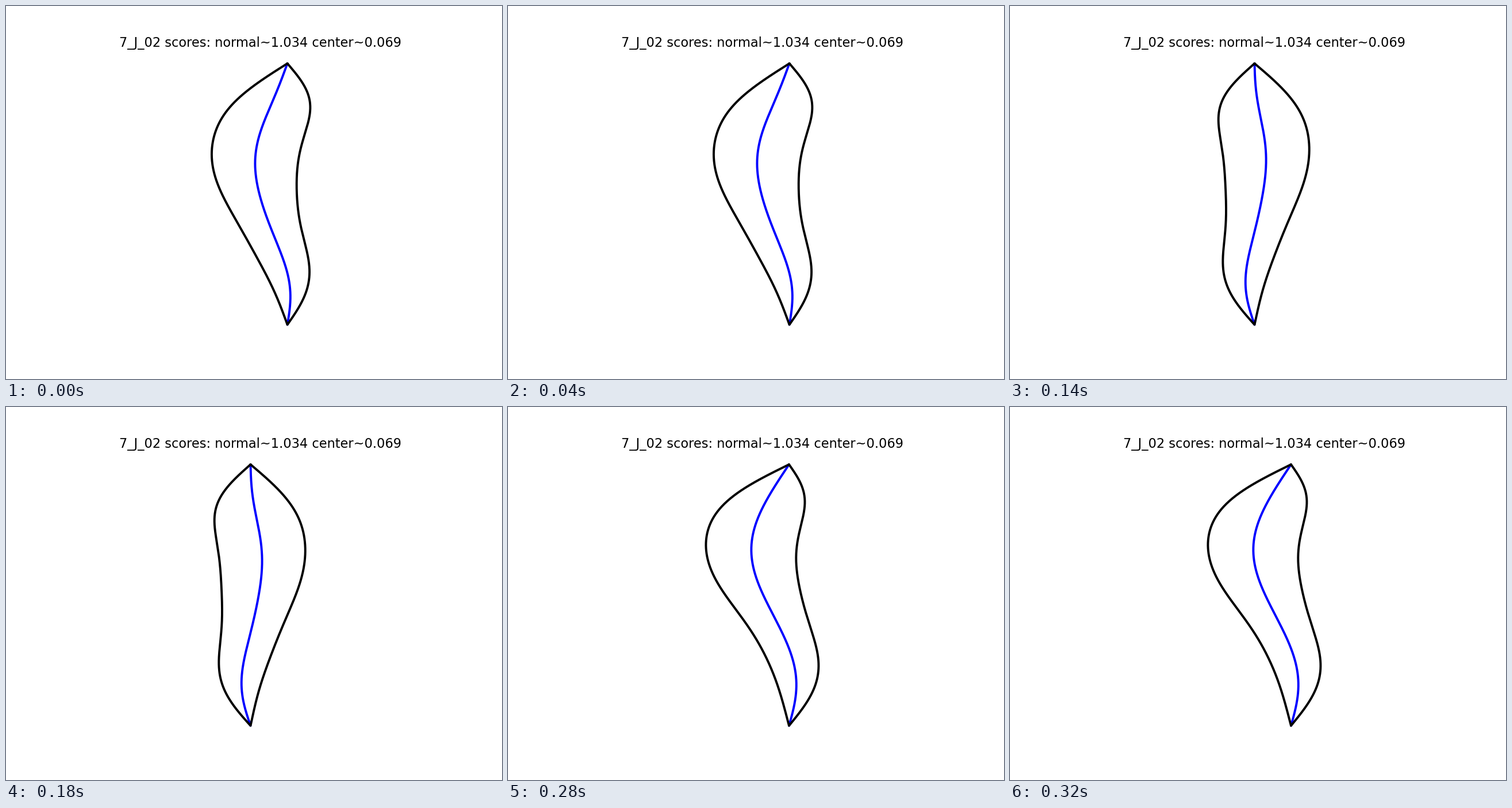
A matplotlib script for the animation above (350 ms loop, 863x649 px).

```python
import numpy as np
import matplotlib.pyplot as plt
from matplotlib.animation import FuncAnimation

W, H, DPI = 863, 649, 64
PT = 72 / DPI  # points per pixel
FRAMES = 5
TOP, BOTTOM = 100, 554.5

# Each swing is a mean followed by cosine and sine parts of its harmonics in time.
TIP = [462.3, 30.2, -16.8, -2.9, 1.7]
# The midline bends as a sum of standing sine waves between the two tips.
BENDS = [
    [-20.3, -31.7, 3.1, 9.1, 1.9],
    [-8.8, -10.1, 23.1],
    [-0.4, 7.6, -1.9],
    [0.9, -1.5, -0.8, 0.45, 1.7],
    [-0.2, 1.6, -0.2],
]
# Sine waves along the midline that give the half width.
GIRTH = [73.5, 16.9, 12.5, 1.9, 2.2, 0.7]


def swing(parts, phase):
    """Value of a swing at the given phase of the loop."""
    value = parts[0]
    for k in range(1, len(parts), 2):
        angle = (k + 1) // 2 * phase
        value += parts[k] * np.cos(angle) + parts[k + 1] * np.sin(angle)
    return value


def waves(heights, u):
    """Sum of sine waves that vanish at u = 0 and u = 1."""
    return sum(a * np.sin(n * np.pi * u) for n, a in enumerate(heights, 1))


u = np.linspace(0, 1, 400)
ys = TOP + (BOTTOM - TOP) * u

fig = plt.figure(figsize=(W / DPI, H / DPI), dpi=DPI, facecolor="white")
ax = fig.add_axes([0, 0, 1, 1])
ax.set(xlim=(0, W), ylim=(H, 0))
ax.axis("off")
ax.text(442.5, 71.5, "7_J_02 scores: normal~1.034 center~0.069", ha="center",
        va="baseline", family="DejaVu Sans", size=22.5 * PT, color="black")

style = dict(lw=3.9 * PT, solid_joinstyle="round", solid_capstyle="round")
middle, = ax.plot([], [], color="#0000ff", **style)
outline, = ax.plot([], [], color="black", **style)


def draw(i):
    phase = 2 * np.pi * i / FRAMES
    mid = swing(TIP, phase) + waves([swing(b, phase) for b in BENDS], u)

    # The width follows the length along the midline; longer poses are wider.
    length = np.r_[0, np.cumsum(np.hypot(np.diff(mid), np.diff(ys)))]
    stretch = length[-1] / (BOTTOM - TOP)
    half = waves(GIRTH, length / length[-1]) * stretch ** 0.75

    middle.set_data(mid, ys)
    outline.set_data(np.r_[mid - half, (mid + half)[::-1], mid[0]],
                     np.r_[ys, ys[::-1], ys[0]])
    return middle, outline


anim = FuncAnimation(fig, draw, frames=FRAMES, interval=70,
                     repeat=True, repeat_delay=0)
plt.show()
```
